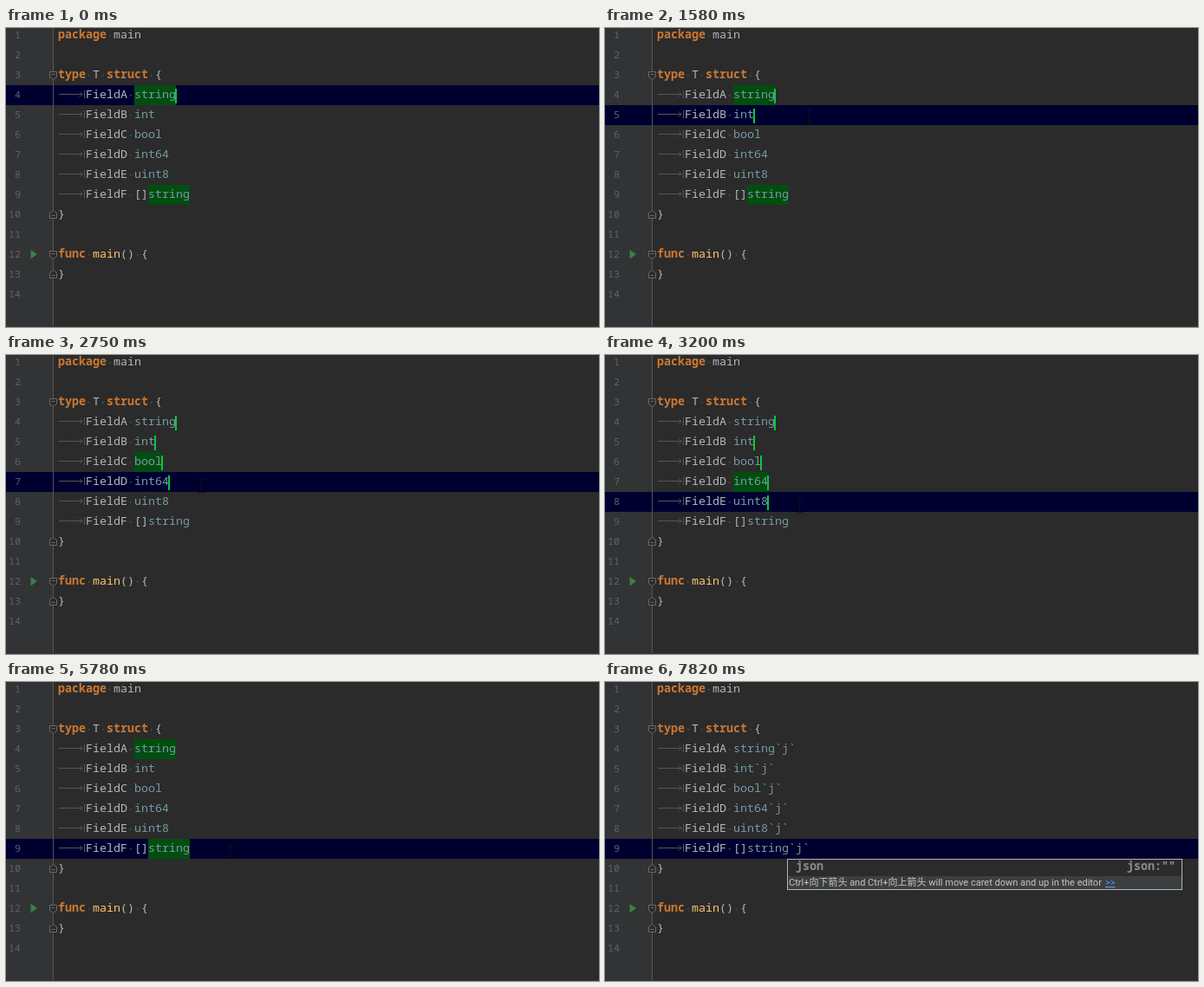
Animation, 684 px wide and 345 px high, one loop 8000 ms. Source, as an HTML page:

```html
<!DOCTYPE html>
<html lang="en">
<head>
<meta charset="utf-8">
<title>Multiple carets</title>
<style>
  html, body { margin: 0; width: 100%; height: 100%; overflow: hidden; background: #2b2b2b; }
  svg { display: block; width: 684px; height: 345px; }
  text { font: 13.333px "Noto Sans Mono", "DejaVu Sans Mono", monospace; fill: #b3b6ba; white-space: pre; }
  .num { font-size: 11.667px; fill: #606366; text-anchor: end; }
  .key { font-weight: bold; fill: #cc7832; }
  .type { fill: #769aa5; }
  .func { fill: #ffc66d; }
  .tag { fill: #7c9672; }
  .item { font-weight: bold; fill: #8c8c8c; }
  .hint { font: 11px Roboto, "Noto Sans CJK SC", "Noto Sans CJK", sans-serif; fill: #c4c4c4; }
  .link { fill: #589df6; text-decoration: underline; }
  .mark { fill: none; stroke: #565656; }
  .fold { fill: #2b2b2b; stroke: #6a6a6a; }
  .hit { fill: #014e10; }
  .caret { fill: #0cc63c; }
  .beam { fill: none; stroke: #101010; }
</style>
</head>
<body>
<svg viewBox="0 0 684 345">
  <rect width="684" height="345" fill="#2b2b2b"/>
  <rect width="54" height="345" fill="#313335"/>
  <rect y="344" width="684" height="1" fill="#353637"/>
  <rect id="band" width="684" height="23" fill="#000030"/>
  <rect x="54" width="1" height="344" fill="#555"/>
  <g id="hits"></g>
  <g id="code"></g>
  <path d="M28.5 256 L36 261 L28.5 266.5Z" fill="#3b8045"/>
  <g id="carets"></g>
  <g id="popup">
    <rect x="210.5" y="204.5" width="455" height="35" fill="#2b2b2b" stroke="#b4b4b4"/>
    <rect x="211" y="224" width="454" height="15" fill="#3c3f41"/>
    <text class="item" x="220" y="217">json</text>
    <text class="item" x="602" y="217">json:""</text>
    <text class="hint" x="212" y="235">Ctrl+向下箭头 and Ctrl+向上箭头 will move caret down and up in the editor</text>
    <text class="hint link" x="577" y="235">&gt;&gt;</text>
  </g>
  <path id="pointer" class="beam" d="M0 .5H3M4 .5H7M3.5 1V15M0 15.5H3M4 15.5H7"/>
</svg>
<script>
const LOOP = 8000;
const $ = id => document.getElementById(id);
const top_ = row => 23 * row - 26;
const colX = col => 60 + 8 * col;

function add(parent, name, attrs, text = "") {
  const el = document.createElementNS("http://www.w3.org/2000/svg", name);
  for (const k in attrs) el.setAttribute(k, attrs[k]);
  el.textContent = text;
  return parent.appendChild(el);
}
const show = (el, on) => el.setAttribute("visibility", on ? "visible" : "hidden");

const code = $("code");
const put = (row, col, text, cls = "") =>
  add(code, "text", { x: colX(col), y: top_(row) + 15, class: cls }, text);
const dot = (row, col) =>
  add(code, "rect", { x: colX(col) + 3, y: top_(row) + 11, width: 1.5, height: 1.5, fill: "#555" });

function fold(row, down) {
  const y = top_(row) + 11.5, s = down ? 1 : -1;
  add(code, "path", { class: "fold",
    d: `M50.5 ${y - 4 * s}H58.5V${y + 2 * s}L54.5 ${y + 5 * s}L50.5 ${y + 2 * s}ZM52.5 ${y - s}H56.5` });
}

for (let n = 1; n <= 14; n++)
  add(code, "text", { class: "num", x: 17, y: top_(n) + 15 }, n);

put(1, 0, "package", "key"); dot(1, 7); put(1, 8, "main");
put(3, 0, "type", "key"); dot(3, 4); put(3, 5, "T"); dot(3, 6);
put(3, 7, "struct", "key"); dot(3, 13); put(3, 14, "{");
put(10, 0, "}");
put(12, 0, "func", "key"); dot(12, 4); put(12, 5, "main", "func"); put(12, 9, "()");
dot(12, 11); put(12, 12, "{");
put(13, 0, "}");
fold(3, true); fold(10, false); fold(12, true); fold(13, false);

// Struct fields: the time each one receives its caret
const fields = [
  ["string", 0], ["int", 1580], ["bool", 2200],
  ["int64", 2675], ["uint8", 3200], ["[]string", 3930]
].map(([type, since], i) => {
  const row = i + 4, y = top_(row), end = 11 + type.length;
  const name = type.replace("[]", ""), start = end - name.length;
  add(code, "path", { class: "mark", d: `M61 ${y + 10.5}H88M85 ${y + 7.5}L88 ${y + 10.5}L85 ${y + 13.5}M90.5 ${y + 6}V${y + 15}` });
  put(row, 4, "Field" + "ABCDEF"[i]);
  dot(row, 10);
  if (start > 11) put(row, 11, "[]");
  put(row, start, name, "type");
  return {
    row, since, end,
    tag: put(row, end, "", "tag"),
    hit: add($("hits"), "rect", { class: "hit", x: colX(start), y, width: 8 * name.length, height: 23 }),
    caret: add($("carets"), "rect", { class: "caret", y: y + 4, width: 2, height: 17 })
  };
});

// Highlighted rows from each time on
const hitSteps = [[0, [4, 9]], [1730, [5]], [2370, [6]], [2825, [7]], [3370, [8]], [4230, [4, 9]], [6660, []]];
// Pointer moves: start, end, steps, final x, final y
const moves = [
  [210, 370, 3, 256, 91], [900, 1210, 5, 240, 94], [1350, 1430, 2, 232, 94],
  [1808, 2122, 5, 225, 119], [2446, 2600, 3, 222, 143], [2900, 3050, 3, 221, 166],
  [3447, 3600, 3, 255, 189], [3750, 3840, 2, 255, 187]
];

function pointerAt(t) {
  let x = 275, y = 91;
  for (const [a, b, n, toX, toY] of moves) {
    if (t < a) break;
    const step = Math.min(n, Math.floor((t - a) / (b - a) * (n - 1) + 1e-6) + 1);
    x += (toX - x) * step / n;
    y += (toY - y) * step / n;
  }
  return [Math.round(x), Math.round(y)];
}

const caretsOn = t =>
  t < 210 || (t >= 1580 && t < 4780) || (t >= 5310 && t < 5780) || (t >= 6330 && t < 7820);

function draw(t) {
  const typed = t < 6330 ? 0 : t < 7210 ? 1 : 2;
  const tag = ["", "``", "`j`"][typed];
  const lit = hitSteps.filter(s => t >= s[0]).pop()[1];
  const on = caretsOn(t);
  let current;
  for (const f of fields) {
    if (t >= f.since) current = f.row;
    if (f.tag.textContent !== tag) f.tag.textContent = tag;
    f.caret.setAttribute("x", colX(f.end + typed) - 1);
    show(f.caret, on && t >= f.since);
    show(f.hit, lit.includes(f.row));
  }
  $("band").setAttribute("y", top_(current));
  $("pointer").setAttribute("transform", `translate(${pointerAt(t)})`);
  show($("pointer"), t >= 210 && t < 6330);
  show($("popup"), t >= 7290);
}

const begin = performance.now();
function tick() {
  draw((performance.now() - begin) % LOOP);
  requestAnimationFrame(tick);
}
draw(0);
requestAnimationFrame(tick);
</script>
</body>
</html>
```
